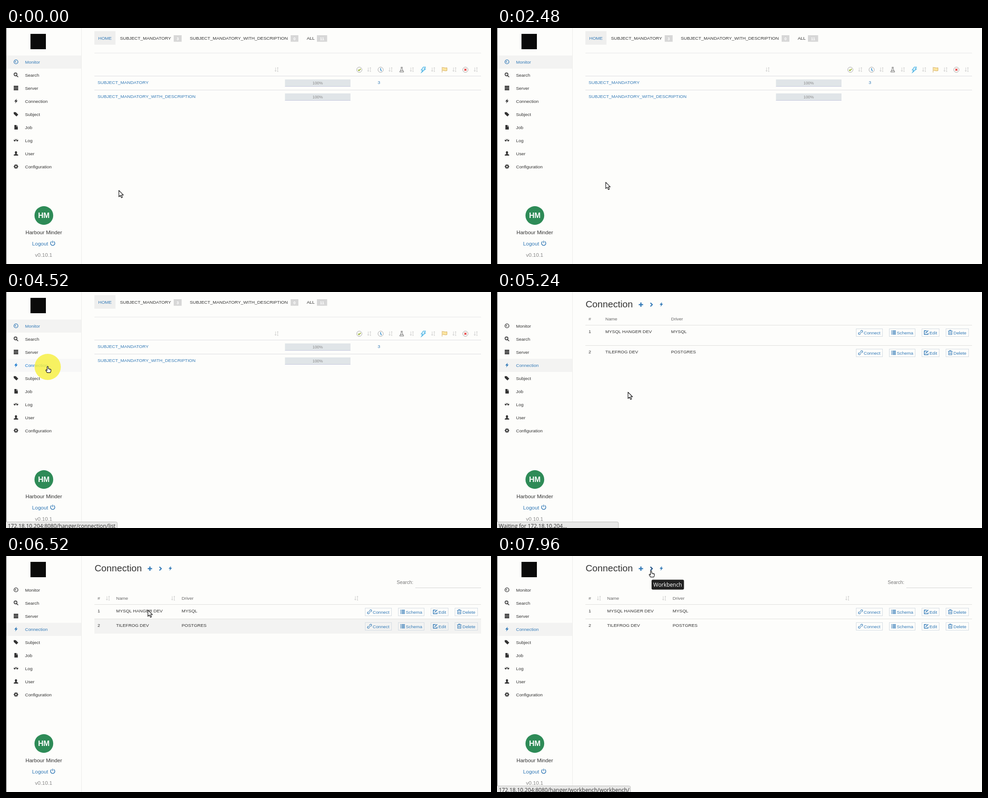
An HTML page with a canvas for the animation above (8 s loop, 1070 px wide and 523 px high).

```html
<!DOCTYPE html>
<html lang="en">
<head>
<meta charset="utf-8">
<title>Connection list</title>
<style>
html, body { margin: 0; width: 100%; height: 100%; overflow: hidden; background: #fdfdfb; }
canvas { display: block; }
</style>
</head>
<body>
<canvas id="stage" width="1070" height="523"></canvas>
<script>
const ctx = document.getElementById('stage').getContext('2d');
const LOOP = 8000;
const SANS = '"Liberation Sans", Arial, sans-serif';
const SYSTEM = '"Open Sans", "Noto Sans", sans-serif';
const BG = '#fdfdfb', INK = '#333', BLUE = '#337ab7', HOVER = '#1878d0', GREY = '#888';
const SHADE = '#f3f3f2', SOFT = '#f7f7f7';
const BODY = 9.89;

// Moments when the picture changes
const PAGE = 5160, TABLE = 5440, LOADED = 5560;
const CLICK = [4400, 4720];
const LINK = [3740, 4760], WAIT = [4760, LOADED], BENCH = 7220, TIP = 7640;

// Pointer path: time, x, y
const PATH = [
  [0, 249, 360], [2200, 249, 360], [2480, 240, 342], [3000, 190, 275], [3400, 128, 195],
  [3600, 106, 158], [3800, 100, 159], [4200, 92, 165], [4720, 92, 165], [5000, 200, 200],
  [5240, 289, 222], [5480, 300, 226], [6080, 302, 222], [6520, 313, 120], [6900, 338, 45],
  [7100, 340, 33], [8000, 340, 33]
];

// Icons are drawn around 0,0; w is a line width, without it the shape is filled
const icon = (d, w) => ({ path: new Path2D(d), w });
const ring = (r, x = 0) => `M${x - r} 0a${r} ${r} 0 1 0 ${2 * r} 0a${r} ${r} 0 1 0 ${-2 * r} 0`;
const ICONS = {
  gauge: icon(ring(4.4) + 'M0 1.5L-2-1.8', 1.4),
  search: icon('M-4.2-1.2a3.2 3.2 0 1 0 6.4 0a3.2 3.2 0 1 0-6.4 0M1.4 1.4L4.8 4.8', 1.6),
  server: icon('M-5-5H5v2.8H-5zM-5-1.4H5v2.8H-5zM-5 2.2H5V5H-5z'),
  bolt: icon('M1.6-5.2L-3.8 .8H-.6L-1.8 5.2L3.8-1.2H.6z'),
  tag: icon('M-5-4.5H-.5L5 1L1 5L-5-.8z'),
  file: icon('M-3.5-5H1V-1.5H4V5H-3.5zM1.8-5L4-2.3H1.8z'),
  glasses: icon(ring(2.2, -2.8) + ring(2.2, 2.8) + 'M-5-1.5L-3.5-2.5H3.5L5-1.5L4-.8H-4z'),
  user: icon('M-2.4-2.4C-2.4-6 2.4-6 2.4-2.4C2.4-.8 1.8 .2 1.2 1L4.8 2.8V4.8H-4.8V2.8L-1.2 1C-1.8 .2-2.4-.8-2.4-2.4z'),
  cog: icon(ring(2.6) + 'M0-5V-3M0 3V5M-5 0H-3M3 0H5M-3.5-3.5L-2.2-2.2M3.5-3.5L2.2-2.2M-3.5 3.5L-2.2 2.2M3.5 3.5L2.2 2.2', 1.9),
  power: icon('M-2.6-3.8a4.7 4.7 0 1 0 5.2 0M0-5.6V-.5', 1.5),
  sort: icon('M-2.3-4.5V4.2M-4.3 2L-2.3 4.3L-.4 2M2.4-4.5V4.5M.8-3L2.4-4.5L4-3M1.2 4.5H3.8', .9),
  plus: icon('M0-4.8V4.8M-4.8 0H4.8', 2.6),
  next: icon('M-2-4L2 0L-2 4', 2.4),
  link: icon('M.8-.8L-.8 .8M-.4-2.2L1.4-4a1.9 1.9 0 0 1 2.7 2.7L2.2 .5M.4 2.2L-1.4 4a1.9 1.9 0 0 1-2.7-2.7L-2.2-.5', 1.2),
  list: icon('M-5-3.7H-3.3M-2.3-3.7H5M-5-1.2H-3.3M-2.3-1.2H5M-5 1.3H-3.3M-2.3 1.3H5M-5 3.8H-3.3M-2.3 3.8H5', 1.6),
  edit: icon('M1-4H-4.3V4.3H4V1M-1.4 1.4L4.3-4.3', 1.5),
  trash: icon('M-3.6-2.5V4.6H3.6V-2.5M-5-3.2H5M-1.6-3.6V-5H1.6V-3.6M-1.3-1V3M1.3-1V3', 1.1),
  flask: icon('M-2-5.5H2M-1.2-5.5V-1.5L-4.5 5H4.5L1.2-1.5V-5.5M-3 2H3', 1),
  spark: icon('M0-6H5L2.4-1.8H5L-4 6.2L-1.2 .8H-4.6z', 1.1),
  flag: icon('M-5.4-6V6.2M-4.6-4.6C-2-6 0-3 5.4-4.5V2C0 3.5-2 .5-4.6 2', .9),
  round: icon(ring(5.8), .9),
  check: icon('M-2.8 0L-.8 2.2L3-2', 1.9),
  hands: icon('M0-3.6V0L2 3', 1.5),
  cross: icon('M-2.2-2.2L2.2 2.2M2.2-2.2L-2.2 2.2', 1.9)
};
const ARROW = new Path2D('M0 0V14L3.3 11L5.6 16.2L8 15.2L5.7 10.2H10z');
const HAND = new Path2D('M-1.4 1C-1.4-.6 1.2-.6 1.2 1V5L3.4 5.2L5.4 5.8L7.2 6.8V10L6 13.6H-1.2L-4.2 9C-4.8 7.4-3.2 6.8-2.4 8L-1.4 9z');
const FINGERS = new Path2D('M3.2 5.6V7.6M5.2 6.2V8');

const MENU = [
  ['gauge', 'Monitor'], ['search', 'Search'], ['server', 'Server'], ['bolt', 'Connection'],
  ['tag', 'Subject'], ['file', 'Job'], ['glasses', 'Log'], ['user', 'User'], ['cog', 'Configuration']
];
const BUTTONS = [
  [792, 59, 'link', 'Connect'], [865, 58, 'list', 'Schema'],
  [937, 39, 'edit', 'Edit'], [990, 51, 'trash', 'Delete']
];
const ROWS = [['1', 'MYSQL HANGER DEV', 'MYSQL'], ['2', 'TILEFROG DEV', 'POSTGRES']];

function text(s, x, y, color = INK, size = BODY, align = 'left', family = SANS, weight = '') {
  ctx.font = `${weight} ${size}px ${family}`;
  ctx.textAlign = align;
  ctx.fillStyle = color;
  ctx.fillText(s, x, y);
}

function box(x, y, w, h, color) {
  ctx.fillStyle = color;
  ctx.fillRect(x, y, w, h);
}

function rule(y, color = '#dcdce0', x = 195, end = 1048) {
  box(x, y, end - x, 1, color);
}

function disc(x, y, r, color) {
  ctx.fillStyle = color;
  ctx.beginPath();
  ctx.arc(x, y, r, 0, Math.PI * 2);
  ctx.fill();
}

function draw(name, x, y, color, inside) {
  const { path, w } = ICONS[name];
  ctx.save();
  ctx.translate(x, y);
  if (inside || !w) {
    ctx.fillStyle = inside || color;
    ctx.fill(path);
  }
  if (w) {
    ctx.lineWidth = w;
    ctx.strokeStyle = color;
    ctx.stroke(path);
  }
  ctx.restore();
}

function pointer(t) {
  const i = Math.max(1, PATH.findIndex(p => p[0] > t));
  const [t0, x0, y0] = PATH[i - 1], [t1, x1, y1] = PATH[i];
  const k = (t - t0) / (t1 - t0);
  return { x: x0 + (x1 - x0) * k, y: y0 + (y1 - y0) * k };
}

function menuAt({ x, y }) {
  const k = Math.floor((y - 61) / 29);
  return x < 166 && k >= 0 && k < MENU.length ? k : -1;
}

const onNext = ({ x, y }) => Math.abs(x - 340) < 7 && y < 40;

function sidebar(t, now, late) {
  const active = t < PAGE ? 0 : 3;
  const over = menuAt(now), shaded = menuAt(late);
  box(166, 0, 1, 523, '#ececea');
  if (t < PAGE || t >= TABLE) box(54, 13, 34, 34, '#0a0a0a');
  MENU.forEach(([name, label], k) => {
    const y = 75 + 29 * k;
    if (k === active) box(1, y - 14, 165, 29, SHADE);
    else if (k === shaded) box(1, y - 14, 165, 29, SOFT);
    const color = k === over ? HOVER : k === active ? BLUE : INK;
    draw(name, 22, y, color);
    text(label, 42, y + 4, color);
  });
  disc(83.5, 415.5, 20.7, '#2e8b57');
  text('HM', 83.5, 421, '#fff', 16.4, 'center', SANS, 'bold');
  text('Harbour Minder', 83.3, 457, INK, 11.6, 'center');
  text('Logout', 57.5, 481.5, BLUE, 11.6);
  draw('power', 103, 477, BLUE);
  text('v0.10.1', 83, 506.5, GREY, 11.6, 'center');
}

function badge(x, w, label) {
  box(x, 16, w, 14.5, '#d7d7d7');
  text(label, x + w / 2, 26.5, '#fff', 9, 'center', SANS, 'bold');
}

function monitor() {
  box(195, 7, 46.5, 30, '#efefee');
  text('HOME', 203.5, 26, BLUE);
  text('SUBJECT_MANDATORY', 251.5, 26);
  badge(370, 17.5, '3');
  text('SUBJECT_MANDATORY_WITH_DESCRIPTION', 405.5, 26);
  badge(628, 17, '0');
  text('ALL', 663.5, 26);
  badge(686, 22.5, '11');
  rule(55, '#e6e6e6');

  draw('sort', 597, 92, '#c8c8c8');
  for (let i = 0; i < 6; i++) draw('sort', 801.5 + 47 * i, 92, '#c8c8c8');
  for (const x of [779.5, 826.5, 1013.5]) draw('round', x, 92.5, '#999');
  draw('check', 779.5, 92.5, '#9db53a');
  draw('hands', 826.5, 92.5, '#2a86c8');
  draw('flask', 873, 92.5, '#666');
  draw('spark', 920.5, 92.5, '#35a9e0', '#d5f0fb');
  draw('flag', 967.5, 92.5, '#cfa24c', '#fde6a0');
  draw('cross', 1013.5, 92.5, '#e23b3b');

  rule(106);
  ['SUBJECT_MANDATORY', 'SUBJECT_MANDATORY_WITH_DESCRIPTION'].forEach((name, i) => {
    const y = 31.7 * i;
    text(name, 202, 123.5 + y, BLUE);
    const top = Math.round(113.5 + y);
    box(615.5, top, 144.5, 16, '#e0e5e8');
    box(615.5, top + 15, 144.5, 1, '#c6c8de');
    text('100%', 687.5, top + 11, GREY, 8.8, 'center');
  });
  text('3', 820, 123.5, BLUE);
  rule(137);
}

function buttons(y) {
  for (const [x, w, name, label] of BUTTONS) {
    ctx.lineWidth = 1;
    ctx.strokeStyle = '#d3dbe2';
    ctx.strokeRect(x + .5, y + .5, w - 1, 17);
    draw(name, x + 10, y + 8.7, BLUE);
    text(label, x + 17, y + 12.5, BLUE);
  }
}

function connection(t, now, late) {
  const ready = t >= TABLE;
  text('Connection', 195.5, 33.5, INK, 20.6);
  draw('plus', 317.5, 28, BLUE);
  draw('next', 340.5, 28, onNext(now) ? '#1d4f82' : BLUE);
  draw('bolt', 362.5, 27.5, BLUE);

  const cols = ready ? [202, 243, 387.5] : [202, 239, 384];
  const head = ready ? 97 : 63, first = ready ? 107 : 73, pitch = ready ? 32 : 45;
  ['#', 'Name', 'Driver'].forEach((s, i) => text(s, cols[i], head, '#666'));
  if (ready) {
    text('Search:', 862, 61.5, '#777', 10.6);
    rule(70, '#d4d4d4', 903);
    for (const x of [225, 369, 773]) draw('sort', x, 93.5, '#c8c8c8');
  }
  ROWS.forEach((row, i) => {
    const y = first + pitch * i;
    const over = ready && late.x > 195 && late.y > y && late.y <= y + pitch;
    if (over) box(195, y + 1, 853, pitch, SHADE);
    rule(y, '#dfdfdc');
    row.forEach((s, c) => text(s, cols[c], y + 18));
    buttons(y + 8);
  });
}

function status(label, width) {
  ctx.beginPath();
  ctx.roundRect(-1.5, 509.5, width + 1, 20, [0, 3, 0, 0]);
  ctx.fillStyle = '#e8e8e7';
  ctx.fill();
  ctx.lineWidth = 1;
  ctx.strokeStyle = '#bdbdbb';
  ctx.stroke();
  text(label, 4, 523, INK, 11.9, 'left', SYSTEM);
}

function cursor({ x, y }, hand) {
  const shape = hand ? HAND : ARROW;
  ctx.save();
  ctx.translate(x, y);
  ctx.lineJoin = 'round';
  ctx.lineWidth = 1.2;
  ctx.strokeStyle = '#111';
  ctx.fillStyle = '#fff';
  ctx.fill(shape);
  ctx.stroke(shape);
  if (hand) {
    ctx.lineWidth = .7;
    ctx.stroke(FINGERS);
  }
  ctx.restore();
}

function tooltip() {
  ctx.beginPath();
  ctx.roundRect(341, 52.5, 71.5, 22, 3);
  ctx.fillStyle = '#222';
  ctx.fill();
  text('Workbench', 376.5, 68, '#fff', 11.9, 'center', SYSTEM);
}

const within = (t, [a, b]) => t >= a && t < b;

function render(t) {
  const now = pointer(t), late = pointer(Math.max(0, t - 120));
  box(0, 0, 1070, 523, BG);
  sidebar(t, now, late);
  if (t < PAGE) monitor();
  else connection(t, now, late);
  box(0, 0, 1, 523, '#4a4a4a');

  if (within(t, LINK)) status('172.18.10.204:8080/hanger/connection/list', 246);
  if (within(t, WAIT)) status('Waiting for 172.18.10.204…', 268.5);
  if (t >= BENCH) status('172.18.10.204:8080/hanger/workbench/workbench/', 295);
  if (t >= TIP) tooltip();
  if (within(t, CLICK)) disc(92, 166, 29, 'rgba(248, 240, 60, .8)');
  cursor(now, menuAt(now) >= 0 || onNext(now));
}

function tick() {
  render(performance.now() % LOOP);
  requestAnimationFrame(tick);
}
tick();
</script>
</body>
</html>
```
